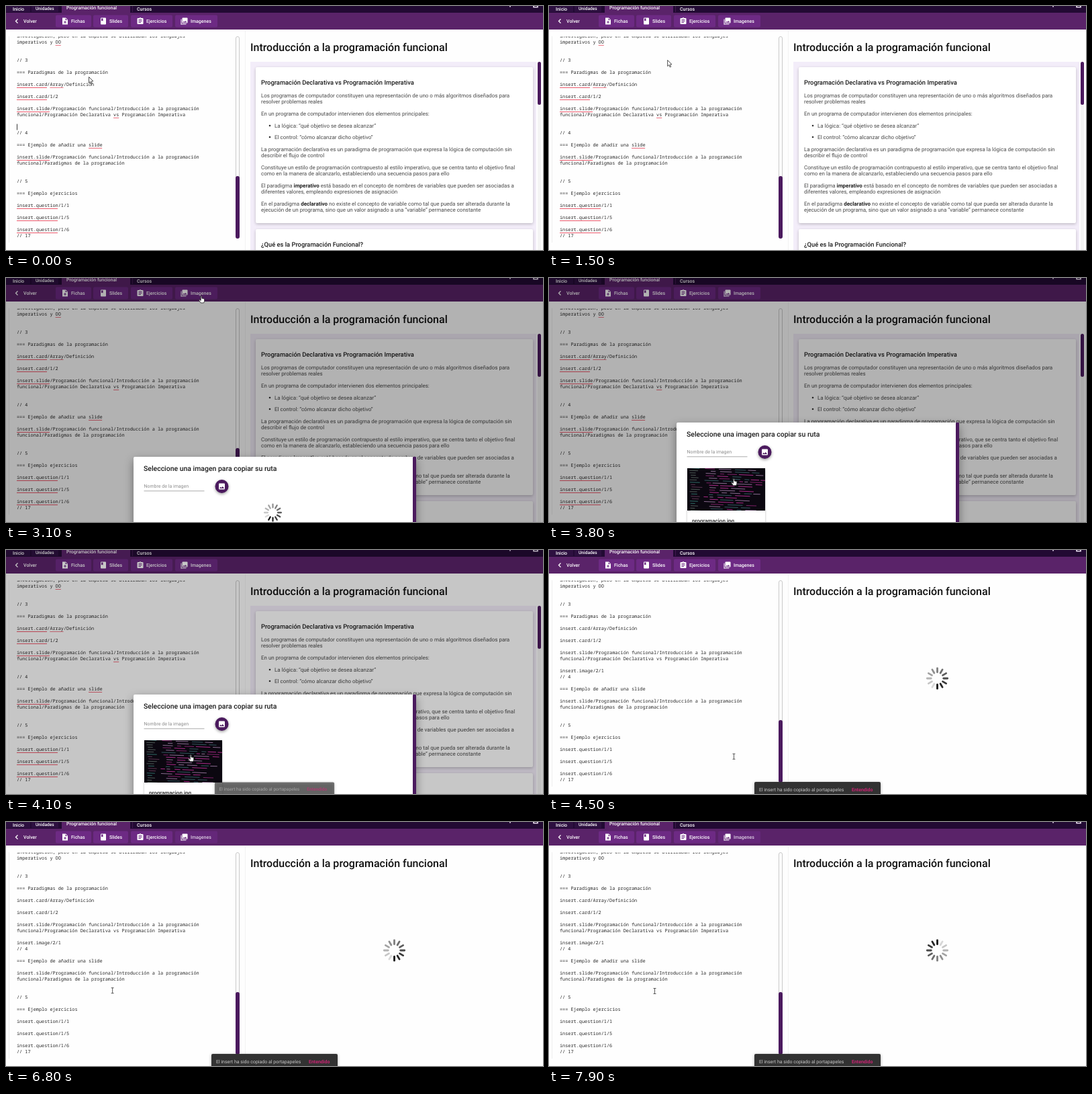
Animation, 800 px wide and 363 px high, one loop 8 s. Source, as an HTML page with a canvas:

```html
<!DOCTYPE html>
<html lang="es">
<head>
<meta charset="utf-8">
<title>Editor de unidades</title>
<style>
html, body { margin: 0; width: 100%; height: 100%; overflow: hidden; background: #fff; }
canvas { display: block; width: 800px; height: 363px; }
</style>
</head>
<body>
<canvas id="stage" width="800" height="363"></canvas>
<script>
const ctx = document.getElementById('stage').getContext('2d');
const LOOP = 8000, W = 800, H = 363;
const SANS = 'Roboto, sans-serif', MONO = '"Noto Sans Mono", monospace';
const PURPLE = '#4b1a5e', BAR = '#5a2369', BUTTON = '#6d2a84';
const OPEN = 2980, LOADED = 3500, CLOSE = 4180, PASTE = 4400, TOAST = 4030;
const CHAR = 4.12;

const clamp = v => Math.max(0, Math.min(1, v));
const ease = v => v * v * (3 - 2 * v);

// Value at time t along [time, value] keys
function track(t, keys) {
  if (t <= keys[0][0]) return keys[0][1];
  for (let i = 1; i < keys.length; i++) {
    const [a, va] = keys[i - 1], [b, vb] = keys[i];
    if (t < b) return va + (vb - va) * ease((t - a) / (b - a));
  }
  return keys[keys.length - 1][1];
}

function box(x, y, w, h, color, r = 0) {
  ctx.fillStyle = color;
  ctx.beginPath();
  ctx.roundRect(x, y, w, h, r);
  ctx.fill();
}

function disc(x, y, r, color) {
  ctx.fillStyle = color;
  ctx.beginPath();
  ctx.arc(x, y, r, 0, Math.PI * 2);
  ctx.fill();
}

function poly(points, color) {
  ctx.fillStyle = color;
  ctx.beginPath();
  points.forEach(([x, y]) => ctx.lineTo(x, y));
  ctx.closePath();
  ctx.fill();
}

function shadowBox(x, y, w, h, color, r, blur, drop, alpha) {
  ctx.save();
  ctx.shadowColor = `rgba(0,0,0,${alpha})`;
  ctx.shadowBlur = blur;
  ctx.shadowOffsetY = drop;
  box(x, y, w, h, color, r);
  ctx.restore();
}

// Draws text with its visual centre near y, returns the end x
function text(str, x, y, size, color, weight = 400, family = SANS) {
  ctx.font = `${weight} ${size}px ${family}`;
  ctx.textRendering = 'geometricPrecision';
  ctx.fillStyle = color;
  ctx.fillText(str, x, y + size * 0.36);
  return x + ctx.measureText(str).width;
}

// Icons on a 24 unit grid, centred at x, y
const icons = {
  card(bg) {
    poly([[4, 2], [14, 2], [20, 8], [20, 22], [4, 22]], '#fff');
    poly([[13, 3.5], [18.5, 9], [13, 9]], bg);
    box(11, 11, 2, 8, bg);
    box(8, 14, 8, 2, bg);
  },
  slide(bg) {
    box(4, 2, 16, 20, '#fff', 2);
    poly([[6, 4], [11, 4], [11, 12], [8.5, 10.5], [6, 12]], bg);
  },
  task(bg) {
    box(3, 3, 18, 18, '#fff', 2);
    disc(12, 4, 3, '#fff');
    disc(12, 4, 1, bg);
    box(7, 7, 10, 2, bg);
    box(7, 11, 10, 2, bg);
    box(7, 15, 7, 2, bg);
  },
  photos(bg) {
    box(2, 6, 2, 16, '#fff', 1);
    box(2, 20, 16, 2, '#fff', 1);
    box(6, 2, 16, 16, '#fff', 2);
    poly([[8, 16], [11, 12], [13, 14.7], [16, 11], [20, 16]], bg);
  },
  photo(bg) {
    box(3, 3, 18, 18, '#fff', 2);
    poly([[5, 18], [8.5, 13.5], [11, 16.5], [14.5, 12], [19, 18]], bg);
  }
};

function icon(name, x, y, size, bg) {
  ctx.save();
  ctx.translate(x - size / 2, y - size / 2);
  ctx.scale(size / 24, size / 24);
  icons[name](bg);
  ctx.restore();
}

function header(t) {
  box(0, 0, W, 11, '#220a33');
  box(0, 0, 36, 9, '#2d1040');
  box(38, 0, 40, 9, '#2d1040');
  box(83, 0, 102, 11, BAR);
  box(188, 0, 1, 9, '#40184f');
  text('Inicio', 10, 4.5, 7, '#fff', 500);
  text('Unidades', 44, 3.5, 6.6, '#fff', 500);
  text('Programación funcional', 90, 2, 7, '#fff', 500);
  text('Cursos', 195, 4.5, 7, '#fff', 500);
  box(750, 0, 2, 1.5, '#cdbbd6');
  box(785, 0, 8, 2.5, '#e4d8ea', 1);
  box(787, 0, 4, 1, '#220a33');

  box(0, 10, W, 25, BAR);
  ctx.strokeStyle = '#fff';
  ctx.lineWidth = 1.3;
  ctx.beginPath();
  ctx.moveTo(17.5, 19.5);
  ctx.lineTo(14.5, 22.5);
  ctx.lineTo(17.5, 25.5);
  ctx.stroke();
  text('Volver', 26, 22.5, 7, '#fff', 500);

  const hover = t > 2450 && t < OPEN;
  const rest = t > 4600 ? '#642779' : BUTTON;
  [
    ['Fichas', 74, 53, 'card', 88, 97, BUTTON],
    ['Slides', 130, 52, 'slide', 145, 154, BUTTON],
    ['Ejercicios', 186, 62, 'task', 200, 209, BUTTON],
    ['Imagenes', 252, 63, 'photos', 265.5, 275, hover ? '#7d3b93' : rest]
  ].forEach(([label, x, w, name, ix, tx, bg]) => {
    box(x, 13.5, w, 18, bg, 2);
    icon(name, ix, 22.5, 12, bg);
    text(label, tx, 22.5, 7, label === 'Imagenes' && t > 4600 ? '#ddcfe4' : '#fff', 500);
  });
}

// Row number, text, misspelt words; rows are 9px apart
const rows = [
  [0, 'investigación, pero en la empresa se utilizaban los lenguajes'],
  [1, 'imperativos y OO', 'OO'],
  [4, '// 3'],
  [6, '=== Paradigmas de la programación'],
  [8, 'insert.card/Array/Definición', 'insert.card', 'Array'],
  [10, 'insert.card/1/2', 'insert.card'],
  [12, 'insert.slide/Programación funcional/Introducción a la programación', 'insert.slide'],
  [13, 'funcional/Programación Declarativa vs Programación Imperativa', 'vs'],
  [16, '// 4'],
  [18, '=== Ejemplo de añadir una slide', 'slide'],
  [20, 'insert.slide/Programación funcional/Introducción a la programación', 'insert.slide'],
  [21, 'funcional/Paradigmas de la programación'],
  [24, '// 5'],
  [26, '=== Ejemplo ejercicios'],
  [28, 'insert.question/1/1', 'insert.question'],
  [30, 'insert.question/1/5', 'insert.question'],
  [32, 'insert.question/1/6', 'insert.question'],
  [33, '// 17']
];

function squiggle(x, y, w) {
  ctx.strokeStyle = '#e8455a';
  ctx.lineWidth = 0.9;
  ctx.beginPath();
  for (let i = 0; i <= w; i++) ctx.lineTo(x + i, y + (i % 2 ? 0.5 : -0.5));
  ctx.stroke();
}

function editor(t) {
  box(4, 45, 1, 307, '#eeeeee');
  box(356, 36, 1, 327, '#f3f3f3');
  ctx.save();
  ctx.beginPath();
  ctx.rect(5, 45.5, 335, 318);
  ctx.clip();
  for (const [n, line, ...bad] of rows) {
    const y = 45 + n * 9;
    text(line, 16, y, CHAR / 0.6, '#262626', 400, MONO);
    if (t < PASTE)
      bad.forEach(w => squiggle(16 + line.indexOf(w) * CHAR, y + 4.5, w.length * CHAR));
  }
  if (t >= PASTE) text('insert.image/2/1', 16, 180, CHAR / 0.6, '#262626', 400, MONO);
  else if (t < OPEN && t % 1000 < 500) box(16, 175.5, 0.9, 9, '#222');
  ctx.restore();

  ctx.strokeStyle = '#c9c9c9';
  ctx.lineWidth = 1;
  ctx.beginPath();
  ctx.roundRect(342.5, 45.5, 5, 300, 2.5);
  ctx.stroke();
  box(342, 253, 6, 93, PURPLE, 3);
}

const paragraphs = [
  [133, 'Los programas de computador constituyen una representación de uno o más algoritmos diseñados para'],
  [142, 'resolver problemas reales'],
  [160, 'En un programa de computador intervienen dos elementos principales:'],
  [178, '•La lógica: “qué objetivo se desea alcanzar”'],
  [195, '•El control: “cómo alcanzar dicho objetivo”'],
  [213, 'La programación declarativa es un paradigma de programación que expresa la lógica de computación sin'],
  [222, 'describir el flujo de control'],
  [240, 'Constituye un estilo de programación contrapuesto al estilo imperativo, que se centra tanto el objetivo final'],
  [249, 'como en la manera de alcanzarlo, estableciendo una secuencia pasos para ello'],
  [267, 'El paradigma *imperativo* está basado en el concepto de nombres de variables que pueden ser asociadas a'],
  [276, 'diferentes valores, empleando expresiones de asignación'],
  [294, 'En el paradigma *declarativo* no existe el concepto de variable como tal que pueda ser alterada durante la'],
  [303, 'ejecución de un programa, sino que un valor asignado a una “variable” permanece constante']
];

function preview(t) {
  text('Introducción a la programación funcional', 364, 61.5, 16, '#111', 500);
  if (t >= PASTE) return spinner(578.5, 191, 16.5, t);

  box(364, 83, 426, 280, '#f3edf9');
  shadowBox(372, 91, 413, 232, '#fff', 2, 4, 1.5, 0.22);
  shadowBox(372, 332, 413, 60, '#fff', 2, 4, 1.5, 0.22);
  box(792, 83, 5, 280, '#f4f4f4');
  box(792, 83, 5, 64, PURPLE, 2.5);
  text('Programación Declarativa vs Programación Imperativa', 380, 114, 9.36, '#1c1c1c', 500);
  text('¿Qué es la Programación Funcional?', 380, 355, 9.36, '#1c1c1c', 500);
  for (const [y, str] of paragraphs) {
    const item = str[0] === '•';
    if (item) disc(393, y, 1.3, '#333');
    let x = item ? 400 : 380;
    str.replace('•', '').split('*').forEach((part, i) => {
      x = text(part, x, y, 8, i % 2 ? '#222' : '#484848', i % 2 ? 700 : 400);
    });
  }
}

function spinner(x, y, r, t) {
  const head = Math.floor((t - 4500) / 62.5 + 6 + 1200) % 12;
  ctx.lineWidth = r * 0.17;
  ctx.lineCap = 'round';
  for (let i = 0; i < 12; i++) {
    const age = (head - i + 12) % 12, a = i * Math.PI / 6;
    const dx = Math.sin(a), dy = -Math.cos(a);
    ctx.strokeStyle = `rgba(0,0,0,${0.92 - age * 0.07})`;
    ctx.beginPath();
    ctx.moveTo(x + dx * r * 0.56, y + dy * r * 0.56);
    ctx.lineTo(x + dx * r * 0.92, y + dy * r * 0.92);
    ctx.stroke();
  }
  ctx.lineCap = 'butt';
}

// Dark thumbnail: short teal marks on the left, long magenta streaks to the right
function thumbnail(x, y, w, h) {
  ctx.save();
  ctx.beginPath();
  ctx.rect(x, y, w, h);
  ctx.clip();
  box(x, y, w, h, '#0b0710');
  ctx.translate(x, y);
  ctx.transform(1, 0.04, 0, 1, 0, -3);
  let seed = 7;
  const rand = () => (seed = seed * 16807 % 2147483647) / 2147483647;
  const pick = list => list[Math.floor(rand() * list.length)];
  for (let row = 0; row < 19; row++) {
    const ry = 2 + row * 3.5;
    box(3 + rand() * 4, ry, 6 + rand() * 10, 1, pick(['#2f6b66', '#4d5a55', '#5b3550']));
    let cx = 24 + rand() * 12;
    const end = 60 + rand() * 54;
    while (cx < end) {
      const len = 5 + rand() * 18;
      box(cx, ry, len, 1, pick(['#a82a86', '#7c2266', '#8a6c90', '#33595f']));
      cx += len + 2 + rand() * 5;
    }
  }
  ctx.restore();
}

function dialog(t) {
  if (t < OPEN || t >= CLOSE) return;
  const loaded = t >= LOADED, top = loaded ? 215 : 266;
  ctx.save();
  ctx.globalAlpha = clamp((t - OPEN) / 100);
  shadowBox(190, top, 421, 200, '#fff', 2, 14, 5, 0.4);
  box(606, top, 5, 200, PURPLE, 1);
  text('Seleccione una imagen para copiar su ruta', 205, top + 17, 10.45, '#1c1c1c', 500);
  text('Nombre de la imagen', 205.5, top + 43, 7, '#8c8c8c');
  box(205.5, top + 50.5, 90, 0.8, '#8f8f8f');
  ctx.save();
  ctx.shadowColor = 'rgba(0,0,0,.4)';
  ctx.shadowBlur = 4;
  ctx.shadowOffsetY = 1.5;
  disc(321.5, top + 44, 10, PURPLE);
  ctx.restore();
  icon('photo', 321.5, top + 44, 12, PURPLE);
  if (loaded) {
    shadowBox(206, 283, 116, 100, '#fff', 2, 3, 1, 0.3);
    thumbnail(206, 283, 116, 63);
    text('programacion.jpg', 213, 361, 8, '#222', 500);
  } else {
    spinner(397.5, 349, 13.5, t);
  }
  ctx.restore();
}

function toast(t) {
  if (t < TOAST) return;
  const k = clamp((t - TOAST) / 150), s = 0.8 + 0.2 * (1 - Math.pow(1 - k, 2.1));
  ctx.save();
  ctx.globalAlpha = clamp(0.18 + k);
  ctx.translate(400, 357);
  ctx.scale(s, s);
  ctx.translate(-400, -357);
  shadowBox(306, 345, 188, 24, '#323232', 2, 4, 1, 0.35);
  text('El insert ha sido copiado al portapapeles', 313, 356, 7, '#c8c8c8');
  text('Entendido', 451, 356, 7, '#e0217c', 500);
  ctx.restore();
}

function pointer(t) {
  const x = track(t, [[900, 123.5], [2500, 291], [3250, 291], [3850, 275], [4650, 275.5], [5600, 165], [6500, 165], [6900, 157.5]]);
  const y = track(t, [[900, 105.5], [2500, 27], [3250, 27], [3850, 304], [4650, 307.5], [5600, 246.5], [6500, 246.5], [6900, 251.5]]);
  const hand = (t > 2350 && t < 3300) || (t > 3700 && t < 4250);
  ctx.save();
  ctx.translate(x, y);
  ctx.lineWidth = 0.8;
  ctx.lineJoin = 'round';
  if (t >= 4250) {
    ctx.strokeStyle = '#333';
    ctx.beginPath();
    for (const s of [-1, 1]) {
      ctx.moveTo(-2, s * 4);
      ctx.lineTo(2, s * 4);
    }
    ctx.moveTo(0, -4);
    ctx.lineTo(0, 4);
    ctx.stroke();
  } else {
    ctx.strokeStyle = '#222';
    poly(hand
      ? [[-0.8, 0], [0.8, 0], [0.8, 3.2], [4.6, 4], [4.6, 7.5], [3.6, 10], [-0.8, 10], [-3.6, 6], [-2.6, 5.2], [-0.8, 6.6]]
      : [[0, 0], [0, 9], [2.1, 7.1], [3.6, 10.4], [5, 9.8], [3.6, 6.6], [6.3, 6.3]], '#fff');
    ctx.stroke();
  }
  ctx.restore();
}

function draw(t) {
  box(0, 0, W, H, '#fefefe');
  editor(t);
  preview(t);
  header(t);
  const dim = track(t, [[2960, 0], [3100, 0.3], [4000, 0.3], [4300, 0]]);
  if (dim > 0) box(0, 0, W, H, `rgba(0,0,0,${dim})`);
  dialog(t);
  toast(t);
  pointer(t);
}

const start = performance.now();
function tick(now) {
  draw(Math.max(0, now - start) % LOOP);
  requestAnimationFrame(tick);
}
draw(0);
requestAnimationFrame(tick);
</script>
</body>
</html>
```
